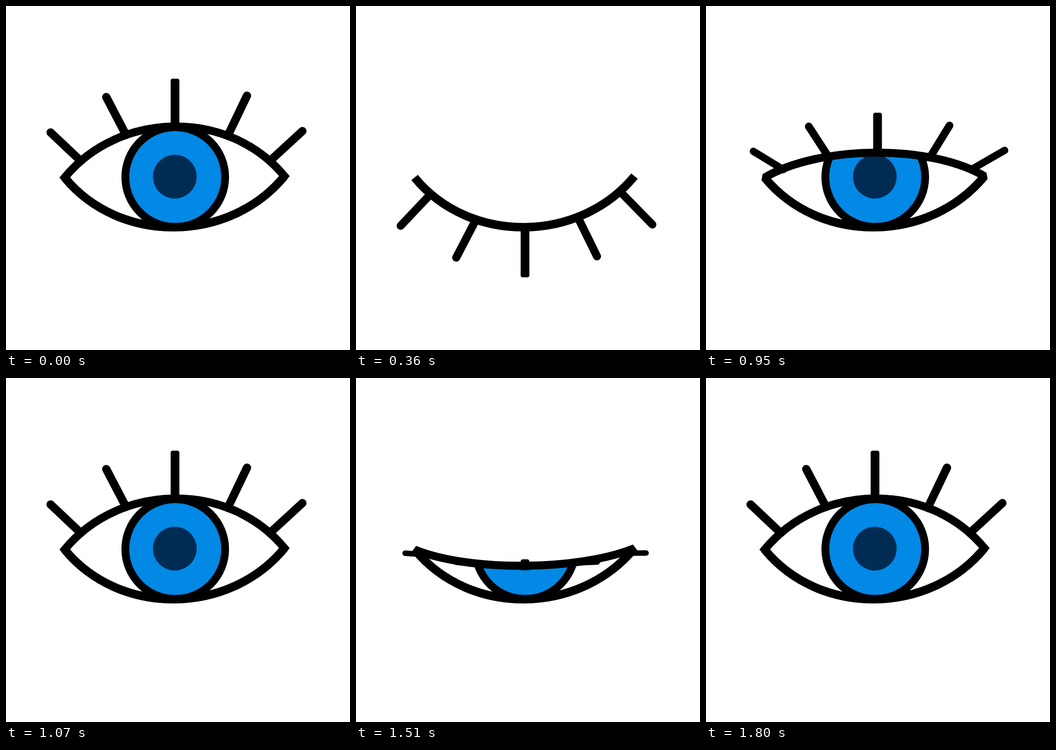
Write an HTML page that moves like this. It is 748 px wide and 748 px high and loops after 4.13 s.

```html
<!DOCTYPE html>
<html lang="en">
<head>
<meta charset="utf-8">
<title>Blinking eye</title>
<style>
  html, body { margin: 0; width: 100%; height: 100%; overflow: hidden; background: #fff; }
  svg { display: block; width: 100vw; height: 100vh; }
  .line { fill: none; stroke: #000; }
  #lid { stroke-width: 17.5; stroke-miterlimit: 1.45; }
  #lower { stroke-width: 18.5; }
  #lashes { stroke-linecap: round; }
</style>
</head>
<body>
<svg viewBox="0 0 748 748">
  <clipPath id="opening"><path id="hole"/></clipPath>
  <g clip-path="url(#opening)">
    <circle cx="368" cy="372" r="108.5" fill="#0288e5" stroke="#000" stroke-width="17"/>
    <circle cx="367" cy="371" r="47.5" fill="#002c53"/>
  </g>
  <path id="lid" class="line"/>
  <path id="lower" class="line"/>
  <g id="lashes" class="line">
    <line/><line/><line/><line/>
  </g>
  <rect id="middle" width="19" rx="4.5"/>
</svg>
<script>
const LOOP = 4130, SHUT = 8;
const LEFT = [127.5, 373], RIGHT = [605.5, 370];
const BOTTOM = 481, LEVEL = 371.5, HANDLE = 120;

// Key poses of the blink; the steps between them are interpolated.
const KEYS = [
  { step: 0, lid: 262, outer: 275, inner: 198, mid: 158, shift: 0 },
  { step: 1, lid: 286, outer: 286, inner: 220, mid: 184, shift: 0 },
  { step: 2, lid: 319, outer: 316, inner: 262, mid: 232, shift: 5.5 },
  { step: 4, lid: 390, outer: 349, inner: 352, mid: 332, shift: 0 },
  { step: 7, lid: 445, outer: 445, inner: 494, mid: 519, shift: 0 },
  { step: 8, lid: 481, outer: 478, inner: 547, mid: 590, shift: 0 }
];

// near and far: how long a step stays while the lid is near open or far from it.
const MOVES = [
  { at: 60, dir: 1, near: 60, far: 30 },
  { at: 770, dir: -1, near: 60, far: 30 },
  { at: 1400, dir: 1, near: 20, far: 30 },
  { at: 1600, dir: -1, near: 80 / 3, far: 30 }
];

// Where the side lashes grow along the lid, and the x of their tips.
const LASHES = [
  { root: 0.09, x: 97, row: "outer", inward: 1, rise: 0 },
  { root: 0.3, x: 218, row: "inner", inward: 0, rise: 0 },
  { root: 0.72, x: 524, row: "inner", inward: 0, rise: 3 },
  { root: 0.918, x: 644.5, row: "outer", inward: -1.4, rise: 3 }
];

const $ = id => document.getElementById(id);
const set = (el, attrs) => { for (const k in attrs) el.setAttribute(k, attrs[k]); };

function poseAt(step) {
  const i = Math.max(1, KEYS.findIndex(k => k.step >= step));
  const a = KEYS[i - 1], b = KEYS[i], f = (step - a.step) / (b.step - a.step);
  const pose = {};
  for (const k in a) pose[k] = a[k] + (b[k] - a[k]) * f;
  return pose;
}

function stepAt(t) {
  const move = MOVES.findLast(m => t >= m.at);
  if (!move) return 0;
  const { at, dir, near, far } = move;
  const last = dir > 0 ? SHUT : 0;
  let step = SHUT - last + dir, end = at;
  while (step !== last) {
    end += step < 4 ? near : far;
    if (t < end - 0.01) break;
    step += dir;
  }
  return step;
}

// Bezier points of an eyelid whose middle lies at the given height.
function eyelid(height) {
  const bulge = (height - LEVEL) * 4 / 3;
  return [
    LEFT,
    [LEFT[0] + HANDLE, LEFT[1] + bulge],
    [RIGHT[0] - HANDLE, RIGHT[1] + bulge],
    RIGHT
  ];
}

function pointOn([a, b, c, d], t) {
  const u = 1 - t;
  return [0, 1].map(i =>
    u * u * u * a[i] + 3 * u * u * t * b[i] + 3 * u * t * t * c[i] + t * t * t * d[i]);
}

const lower = eyelid(BOTTOM);
set($("lower"), { d: `M${lower[0]}C${lower.slice(1).join(" ")}` });

function draw(step) {
  const pose = poseAt(step), upper = eyelid(pose.lid);
  const d = `M${upper[0]}C${upper.slice(1).join(" ")}C${lower.slice(0, 3).reverse().join(" ")}Z`;
  set($("hole"), { d });
  set($("lid"), { d });

  // Lashes pointing at the viewer look thinner.
  const facing = Math.max(0, 1 - Math.abs(pose.lid - 390) / 100);
  LASHES.forEach(({ root, x, row, inward, rise }, i) => {
    const [x2, y2] = pointOn(upper, root);
    set($("lashes").children[i], {
      x1: x + pose.shift + 18 * inward * facing ** 3,
      y1: pose[row] - rise * (1 - facing),
      x2: x2 + pose.shift, y2,
      "stroke-width": 18 - (row === "outer" ? 7.5 : 4) * facing
    });
  });
  set($("middle"), {
    x: 358 + pose.shift,
    y: Math.min(pose.mid, pose.lid),
    height: Math.abs(pose.mid - pose.lid)
  });
}

let shown = -1;
function tick() {
  const step = stepAt(performance.now() % LOOP);
  if (step !== shown) draw(shown = step);
  requestAnimationFrame(tick);
}
tick();
</script>
</body>
</html>
```
